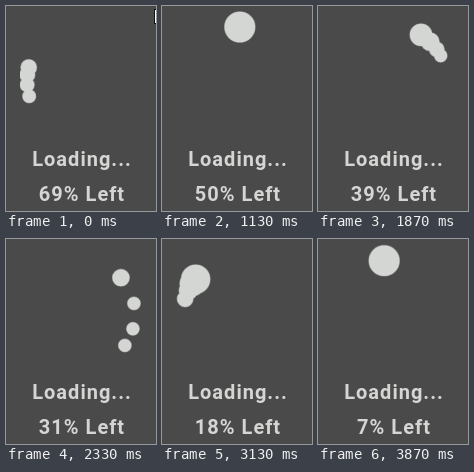
An HTML page with a canvas for the animation above (3940 ms loop, 150 by 205 pixels).

```html
<!DOCTYPE html>
<html lang="en">
<head>
<meta charset="utf-8">
<title>Loading</title>
<style>
  html, body { margin: 0; width: 100%; height: 100%; overflow: hidden; background: #4a4a4a; }
  canvas { display: block; width: 150px; height: 205px; }
</style>
</head>
<body>
<canvas id="stage"></canvas>
<script>
const W = 150, H = 205, LOOP = 3940, STEP = 200 / 3;
const ORBIT = { x: 75, y: 75, r: 54, period: 2960 };
const DOTS = 4;
const BACK = '#4a4a4a', INK = '#d4d6d3', RIM = '#858685';

const canvas = document.getElementById('stage');
const dpr = window.devicePixelRatio || 1;
canvas.width = Math.round(W * dpr);
canvas.height = Math.round(H * dpr);
const ctx = canvas.getContext('2d');
ctx.scale(dpr, dpr);

const ramp = (x, a, b) => Math.min(1, Math.max(0, (x - a) / (b - a)));
const smooth = (x, a, b) => {
  const u = ramp(x, a, b);
  return u * u * (3 - 2 * u);
};

function orbitTime(t) {
  if (t > 2799) return t - ORBIT.period;
  return t - 95 * (1 - ramp(t, 0, 500));
}

// Leading dot, clockwise degrees from the top: steady drift over the top,
// braking on the way in and a rush around the bottom on the way out
function leadAngle(p) {
  const drift = 330 + 0.0547 * (p - 530);
  const brake = 1 - ramp(p, -160, 240);
  const rush = ramp(p, 1600, 2800);
  return drift - 16 * brake ** 2 + 85 * rush + 97 * rush ** 6;
}

// Degrees between first and last dot at a few orbit times
const spreadKeys = [[-160, 49], [-95, 31], [240, 22], [530, 0],
  [1400, 0], [1870, 31], [2670, 112], [2800, 49]];

function spread(p) {
  const i = Math.max(1, spreadKeys.findIndex(k => p <= k[0]));
  const [t0, a] = spreadKeys[i - 1], [t1, b] = spreadKeys[i];
  return a + (b - a) * ramp(p, t0, t1);
}

// Dots swell towards the top and shrink after it
function dotSize(deg) {
  const a = deg > 500 ? deg - 360 : deg;
  const grow = 6.5 + 1.5 * ramp(a, 250, 284) + 7.3 * smooth(a, 288, 316);
  const shrink = 15.3 - 8.8 * ramp(a, 364, 421);
  return Math.min(grow, shrink);
}

function drawDots(t) {
  const p = orbitTime(t);
  const path = new Path2D();
  for (let i = 0; i < DOTS; i++) {
    const deg = leadAngle(p) - spread(p) * (i / (DOTS - 1)) ** 1.25;
    const a = deg * Math.PI / 180, r = dotSize(deg);
    const x = ORBIT.x + ORBIT.r * Math.sin(a), y = ORBIT.y - ORBIT.r * Math.cos(a);
    path.moveTo(x + r, y);
    path.arc(x, y, r, 0, 2 * Math.PI);
  }
  ctx.save();
  ctx.beginPath();
  ctx.rect(14, 0, 122, 140);
  ctx.clip();
  ctx.strokeStyle = RIM;
  ctx.lineWidth = 1.2;
  ctx.stroke(path);
  ctx.fillStyle = INK;
  ctx.fill(path);
  ctx.restore();
}

function drawText(t) {
  ctx.font = 'bold 20px Roboto, Arial, sans-serif';
  ctx.letterSpacing = '1px';
  ctx.textAlign = 'center';
  ctx.fillStyle = INK;
  ctx.fillText('Loading...', 76, 160);
  ctx.fillText(Math.floor(69.1 - 0.01602 * t) + '% Left', 76, 195);
}

function drawPointer() {
  ctx.fillStyle = '#111';
  ctx.fillRect(148, 3, 2, 15);
  ctx.fillStyle = '#fff';
  ctx.fillRect(149, 4, 1, 13);
}

function draw(now) {
  const tick = Math.floor((now % LOOP + 4) / STEP);
  const t = Math.min(tick, 58) * STEP;
  ctx.fillStyle = BACK;
  ctx.fillRect(0, 0, W, H);
  drawDots(t);
  drawText(t);
  if (tick === 0) drawPointer();
}

let start;
function loop(now) {
  if (start === undefined) start = now;
  draw(Math.max(0, now - start));
  requestAnimationFrame(loop);
}
draw(0);
requestAnimationFrame(loop);
</script>
</body>
</html>
```
